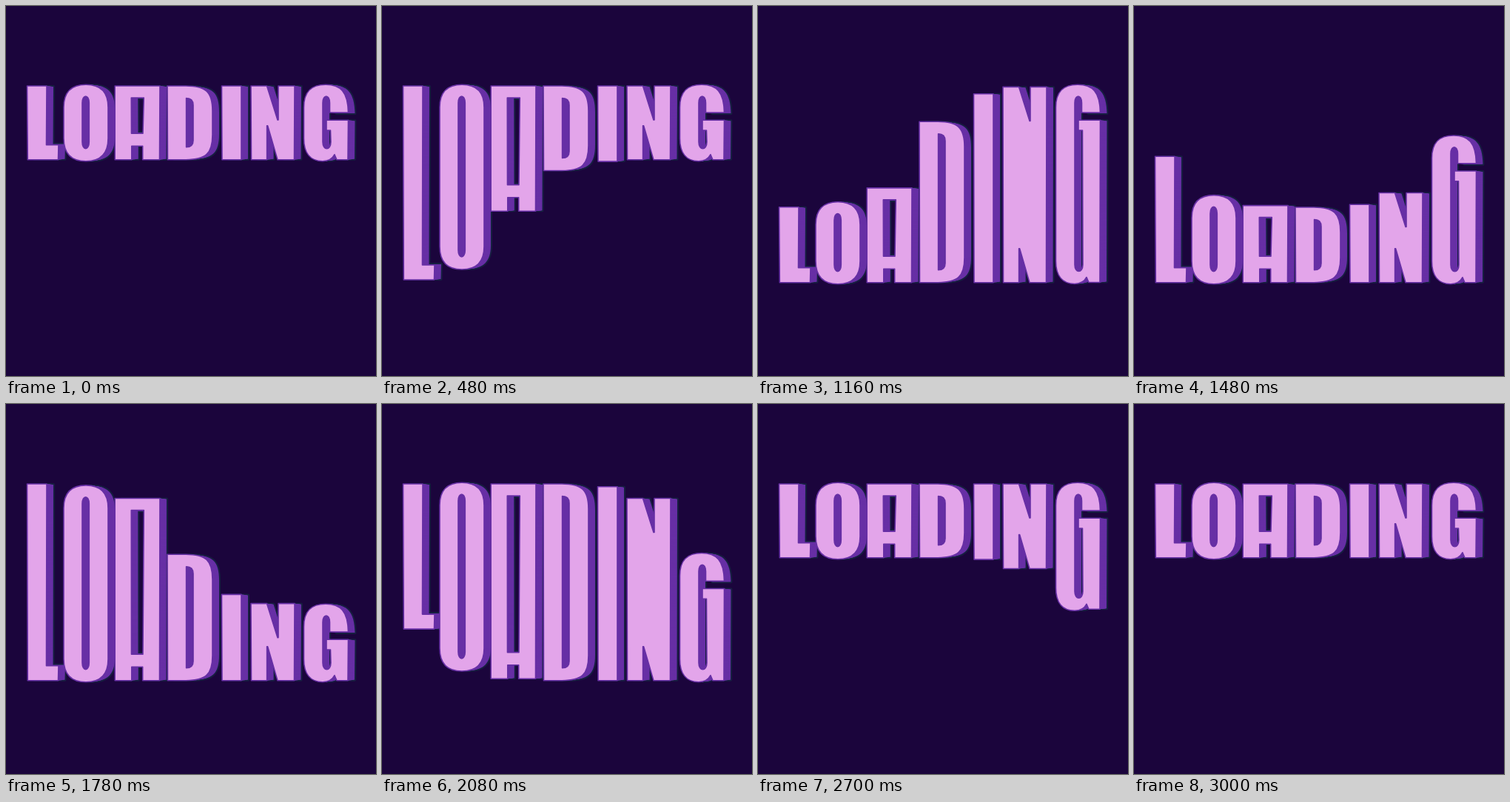
Animation of 500x500 px, one loop 3040 ms. Source, as an HTML page with a canvas:

```html
<!DOCTYPE html>
<html lang="en">
<head>
<meta charset="utf-8">
<title>Loading</title>
<style>
html, body { margin: 0; width: 100%; height: 100%; overflow: hidden; background: #1b053c; }
canvas { display: block; }
</style>
</head>
<body>
<canvas id="stage" width="500" height="500"></canvas>
<script>
const ctx = document.getElementById('stage').getContext('2d');
const BG = '#1b053c', EDGE = '#161f40', SIDE = '#672fa5', FACE = '#e3a5ea';
const LOOP = 3040, STEP = 20, MOVE = 600, STAGGER = 100, DEPTH = 9;

// Each outline hangs partly on the top line t and partly on the bottom line b.
const letters = [
  // L
  (t, b) => `M28.5 ${t}H55L54.5 ${b - 20}H71L70.5 ${b}H29.3Z`,
  // O
  (t, b) => `M78 ${t + 29}C78 ${t + 8} 88 ${t - 1.8} 108 ${t - 1.8}S138 ${t + 8} 138 ${t + 29}
    V${b - 29}C138 ${b - 8} 128 ${b + 2} 108 ${b + 2}S78 ${b - 8} 78 ${b - 29}Z
    M103 ${t + 23}C103 ${t + 11} 112.3 ${t + 11} 112.3 ${t + 23}
    V${b - 24}C112.3 ${b - 12} 103 ${b - 12} 103 ${b - 24}Z`,
  // A
  (t, b) => `M147.2 ${t}H208L207.5 ${b}H184.7V${b - 18.5}H169.8V${b}H147.2Z
    M169.3 ${t + 16}H186.3L185 ${b - 35.5}H169.5Z`,
  // D
  (t, b) => `M218 ${t}H243C270 ${t} 279 ${t + 8} 279 ${t + 34}
    V${b - 34}C279 ${b - 8} 270 ${b} 243 ${b}H218.5Z
    M243.6 ${t + 16.5}C250 ${t + 16.5} 253 ${t + 19} 253 ${t + 26}
    V${b - 26}C253 ${b - 20} 250 ${b - 17} 243.6 ${b - 17}Z`,
  // I
  (t, b) => `M291.5 ${t}H318V${b}H292Z`,
  // N
  (t, b) => `M331 ${t}H352.5L367 ${t + 46}H368V${t}H390L389.5 ${b}H367
    L353.6 ${b - 46}H352.6V${b}H331.5Z`,
  // G
  (t, b) => `M402.5 ${t + 29}C402.5 ${t + 8} 412 ${t - 1.8} 432 ${t - 1.8}S462 ${t + 8} 462.5 ${t + 36}
    H437.5V${t + 23}C437.5 ${t + 11} 428 ${t + 11} 428 ${t + 23}
    V${b - 24}C428 ${b - 12} 439 ${b - 12} 439 ${b - 24}L438.5 ${t + 60}H433V${t + 46.3}H462.5
    L462 ${b}H447L444 ${b - 7}C441 ${b - 1} 436 ${b + 2} 428 ${b + 2}
    C412 ${b + 2} 402.5 ${b - 8} 402.5 ${b - 29}Z`
];

// Cubic-bezier(.8, 0, .2, 1)
function ease(x) {
  if (x <= 0) return 0;
  if (x >= 1) return 1;
  let lo = 0, hi = 1, u;
  for (let i = 0; i < 24; i++) {
    u = (lo + hi) / 2;
    const v = 1 - u;
    if (2.4 * u * v * v + 0.6 * u * u * v + u * u * u < x) lo = u; else hi = u;
  }
  return u * u * (3 - 2 * u);
}

function drawLetter(outline, time) {
  const part = n => ease(time / MOVE - n);
  // Bottom drops, top follows, top rises, bottom follows.
  const bottom = 207.7 + 166 * (part(0) - part(3));
  const top = 108 + 164 * (part(1) - part(2));

  // Layers from back to front; the sides get slightly shorter towards the back.
  for (let d = DEPTH; d >= 0; d--) {
    const inset = d / DEPTH;
    const path = new Path2D(outline(top + inset, bottom - inset));
    ctx.save();
    ctx.translate(d, 0);
    if (d === DEPTH) {
      ctx.strokeStyle = EDGE;
      ctx.lineWidth = 4;
      ctx.stroke(path);
    }
    ctx.fillStyle = d ? SIDE : FACE;
    ctx.fill(path, 'evenodd');
    if (d === 0) {
      ctx.strokeStyle = SIDE;
      ctx.lineWidth = 1.6;
      ctx.stroke(path);
    }
    ctx.restore();
  }
}

ctx.lineJoin = 'round';
const start = performance.now();

function frame() {
  const now = (performance.now() - start) % LOOP;
  const time = Math.floor(now / STEP) * STEP + STEP / 2;
  ctx.fillStyle = BG;
  ctx.fillRect(0, 0, 500, 500);
  letters.forEach((outline, i) => drawLetter(outline, time - i * STAGGER));
  requestAnimationFrame(frame);
}
frame();
</script>
</body>
</html>
```
